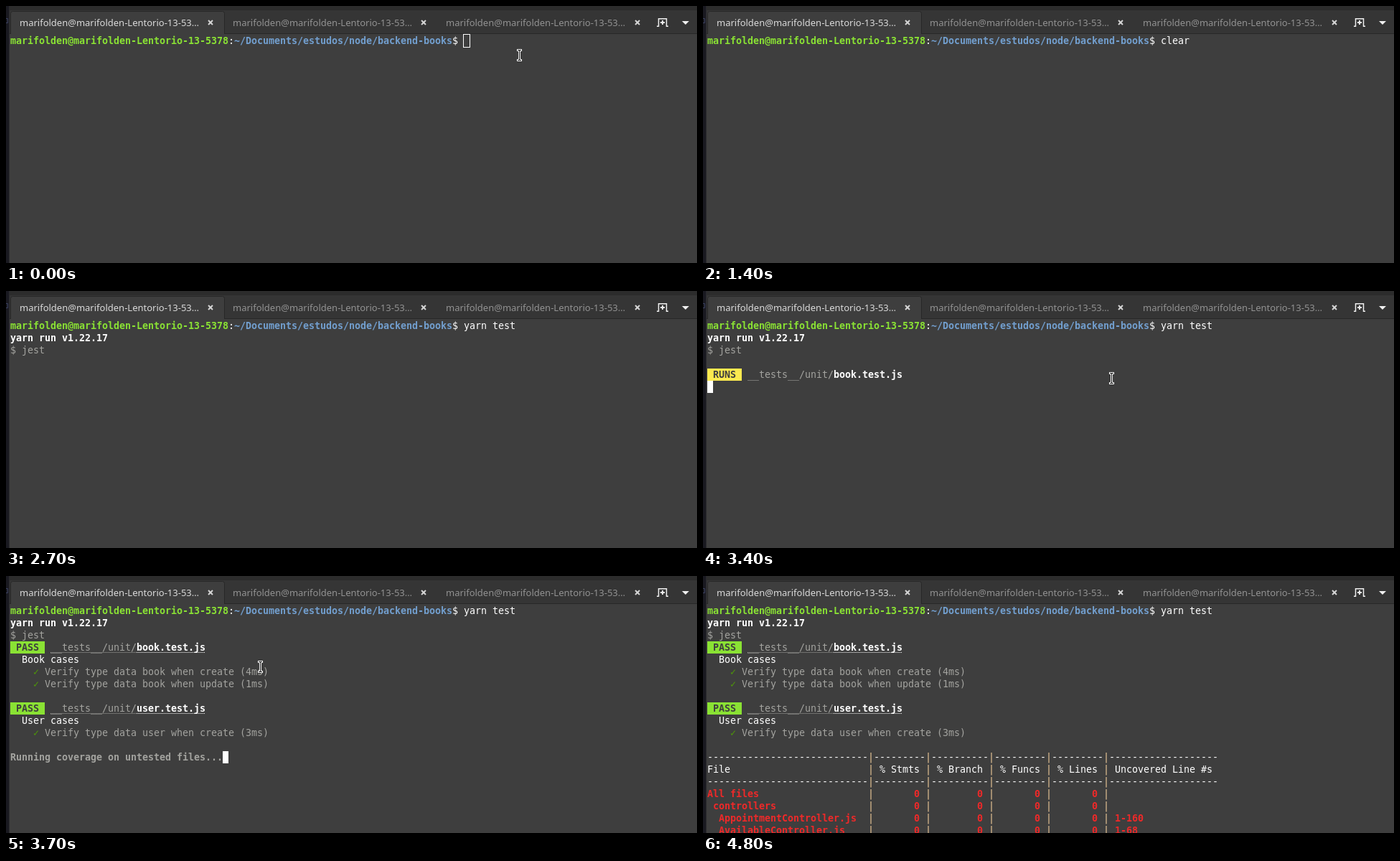
Animation, 963 px wide and 358 px high, one loop 5 s. Source, as an HTML page with a canvas:

```html
<!DOCTYPE html>
<html lang="en">
<head>
<meta charset="utf-8">
<title>Terminal test run</title>
<style>
html, body { margin: 0; width: 100%; height: 100%; overflow: hidden; background: #3e3e3e; }
canvas { display: block; }
</style>
</head>
<body>
<canvas id="stage" width="963" height="358"></canvas>
<script>
const ctx = document.getElementById('stage').getContext('2d');
const LOOP = 5000, LEFT = 6, TOP = 40, CELL = 8, ROW = 17;
const BACK = '#3e3e3e', WHITE = '#ffffff', DIM = '#a3a39f', GREEN = '#8ae234', BLUE = '#729fcf',
  YELLOW = '#fce94f', RED = '#ef2929', CHECK = '#4e9a06', PIPE = '#efcb98';
const USER = 'marifolden', HOST = USER + '-Lentorio-13-5378';
const PATH = '~/Documents/estudos/node/backend-books';

function box(color, x, y, w, h) {
  ctx.fillStyle = color;
  ctx.fillRect(x, y, w, h);
}

function line(color, width, ...points) {
  ctx.strokeStyle = color;
  ctx.lineWidth = width;
  ctx.beginPath();
  for (let i = 0; i < points.length; i += 2) ctx.lineTo(points[i], points[i + 1]);
  ctx.stroke();
}

function shape(color, ...points) {
  ctx.fillStyle = color;
  ctx.beginPath();
  for (let i = 0; i < points.length; i += 2) ctx.lineTo(points[i], points[i + 1]);
  ctx.closePath();
  ctx.fill();
}

// Writes text on the terminal grid and returns the next free column.
function put(row, col, text, color = WHITE, bold = false) {
  ctx.font = (bold ? 'bold ' : '') + '13.33px "DejaVu Sans Mono", monospace';
  for (const char of text) {
    ctx.fillStyle = char === '|' ? PIPE : color;
    if (char !== ' ') ctx.fillText(char, LEFT + col * CELL, TOP + row * ROW + 13);
    col++;
  }
  return col;
}

function cursor(row, col) {
  box(WHITE, LEFT + col * CELL, TOP + row * ROW, CELL, ROW);
}

function hollowCursor(row, col) {
  ctx.strokeStyle = WHITE;
  ctx.lineWidth = 1;
  ctx.strokeRect(LEFT + col * CELL - 0.5, TOP + row * ROW - 0.5, CELL + 1, ROW + 1);
}

function dots(row, from, to, color) {
  const y = TOP + row * ROW + 15;
  for (let x = LEFT + from * CELL; x < LEFT + to * CELL; x += 2) box(color, x, y, 1, 1);
}

function drawTab(x, closeX, color) {
  ctx.font = '13px "Noto Sans", sans-serif';
  ctx.fillStyle = color;
  ctx.fillText((USER + '@' + HOST).slice(0, -2) + '…', x, 28);
  line('#d6d6d6', 2, closeX - 3, 20, closeX + 3, 26);
  line('#d6d6d6', 2, closeX + 3, 20, closeX - 3, 26);
}

function drawWindow() {
  box(BACK, 0, 0, 963, 358);
  box('#353535', 4, 5, 959, 33);
  box('#2c2c2c', 4, 0, 959, 6);
  box('#272727', 4, 38, 959, 1);
  ctx.beginPath();
  ctx.roundRect(6.5, 7.5, 298, 33, [3, 3, 0, 0]);
  ctx.fillStyle = BACK;
  ctx.fill();
  ctx.strokeStyle = '#272727';
  ctx.lineWidth = 1;
  ctx.stroke();
  box(BACK, 5, 39, 958, 4);
  box('#191920', 0, 0, 4, 358);
  box('#2a2a2e', 4, 0, 1, 358);
  line('#39405e', 1, 0, 17.5, 2.5, 17.5, 2.5, 23.5, 0, 23.5);

  drawTab(19, 285, '#dadada');
  drawTab(316, 582, '#929292');
  drawTab(613, 880, '#929292');

  line('#f0f0f0', 1.5, 907, 28.2, 909.5, 28.2, 909.5, 17.8, 920.5, 17.8, 920.5, 28.2, 923, 28.2);
  line('#f0f0f0', 2, 912, 23, 918, 23);
  line('#f0f0f0', 2, 915, 20, 915, 26);
  shape('#f0f0f0', 942, 21, 952, 21, 947, 26);
}

function drawPrompt(command) {
  let col = put(0, 0, USER + '@' + HOST, GREEN, true);
  col = put(0, col, ':');
  col = put(0, col, PATH, BLUE, true);
  return put(0, col, '$ ' + command);
}

function suite(row, status, color, file) {
  box(color, LEFT, TOP + row * ROW, 6 * CELL, ROW);
  put(row, 1, status, BACK, true);
  const mid = put(row, 7, '__tests__/unit/', DIM);
  const end = put(row, mid, file, WHITE, true);
  if (status === 'PASS') {
    dots(row, 7, mid, DIM);
    dots(row, mid, end, WHITE);
  }
}

function check(row, text) {
  put(row, 4, '✓', CHECK);
  put(row, 6, 'Verify type data ' + text, DIM);
}

function bookResults() {
  suite(3, 'PASS', GREEN, 'book.test.js');
  put(4, 2, 'Book cases');
  check(5, 'book when create (4ms)');
  check(6, 'book when update (1ms)');
}

function userResults() {
  suite(8, 'PASS', GREEN, 'user.test.js');
  put(9, 2, 'User cases');
  check(10, 'user when create (3ms)');
}

function coverageTable() {
  const rule = [28, 9, 10, 9, 9, 19].map(n => '-'.repeat(n)).join('|');
  put(12, 0, rule);
  put(13, 0, 'File'.padEnd(28) + '| % Stmts | % Branch | % Funcs | % Lines | Uncovered Line #s');
  put(14, 0, rule);
  const files = [['All files', ''], [' controllers', ''],
    ['  AppointmentController.js', '1-160'], ['  AvailableController.js', '1-68']];
  files.forEach(([name, uncovered], i) => {
    const row = 15 + i;
    put(row, 0, name, RED, true);
    for (const col of [28, 38, 49, 59, 69]) put(row, col, '|');
    for (const col of [36, 47, 57, 67]) put(row, col, '0', RED, true);
    put(row, 71, uncovered, RED, true);
  });
}

function drawTerminal(t) {
  if (t < 1700) {
    const typed = t >= 800 && t < 1600 ? 'clear' : '';
    const end = drawPrompt(typed);
    if (t < 200) hollowCursor(0, end);
    else if (t < 1400 || t >= 1600) cursor(0, end);
    return;
  }
  const end = drawPrompt('yarn test');
  if (t < 2200) return cursor(0, end);
  if (t < 2300) return cursor(1, 0);

  put(1, 0, 'yarn run v1.22.17', WHITE, true);
  put(2, 0, '$ jest', DIM);
  if (t < 2700) return cursor(3, 0);
  if (t < 3200) return;
  if (t < 3500) {
    suite(4, 'RUNS', YELLOW, 'book.test.js');
    return cursor(5, 0);
  }
  bookResults();
  if (t < 3700) {
    suite(9, 'RUNS', YELLOW, 'user.test.js');
    return cursor(10, 0);
  }
  userResults();
  if (t < 3900) cursor(12, put(12, 0, 'Running coverage on untested files...', DIM, true));
  else coverageTable();
}

// Pointer path as [time, left, top]
const path = [[3100, 683, 74], [3400, 566, 113], [3500, 503, 121], [3700, 351, 118],
  [3900, 203, 61], [4000, 203, 61], [4300, 58, 0], [4400, 58, 0]];

function pointerAt(t) {
  if (t < 800) return [712, 60];
  const step = Math.floor(t / 100) * 100;
  const next = path.findIndex(p => p[0] > step);
  if (next < 1) return null;
  const [t0, x0, y0] = path[next - 1], [t1, x1, y1] = path[next];
  const k = (step - t0) / (t1 - t0);
  return [Math.round(x0 + (x1 - x0) * k), Math.round(y0 + (y1 - y0) * k)];
}

function drawPointer(t) {
  const spot = pointerAt(t);
  if (!spot) return;
  const [x, y] = spot;
  if (y < 30) {
    const arrow = [0, 0, 0, 15, 4, 12, 6, 17, 8, 16, 6, 11, 11, 11]
      .map((v, i) => v + (i % 2 ? y : x) + 0.5);
    shape(WHITE, ...arrow);
    line('#111111', 1, ...arrow, arrow[0], arrow[1]);
    return;
  }
  box(WHITE, x, y, 7, 3);
  box(WHITE, x, y + 14, 7, 3);
  box(WHITE, x + 2, y + 2, 3, 13);
  box('#111111', x + 1, y + 1, 5, 1);
  box('#111111', x + 1, y + 15, 5, 1);
  box('#111111', x + 3, y + 1, 1, 15);
}

const start = performance.now();

function render() {
  const t = (performance.now() - start) % LOOP;
  drawWindow();
  drawTerminal(t);
  drawPointer(t);
  requestAnimationFrame(render);
}
render();
</script>
</body>
</html>
```
